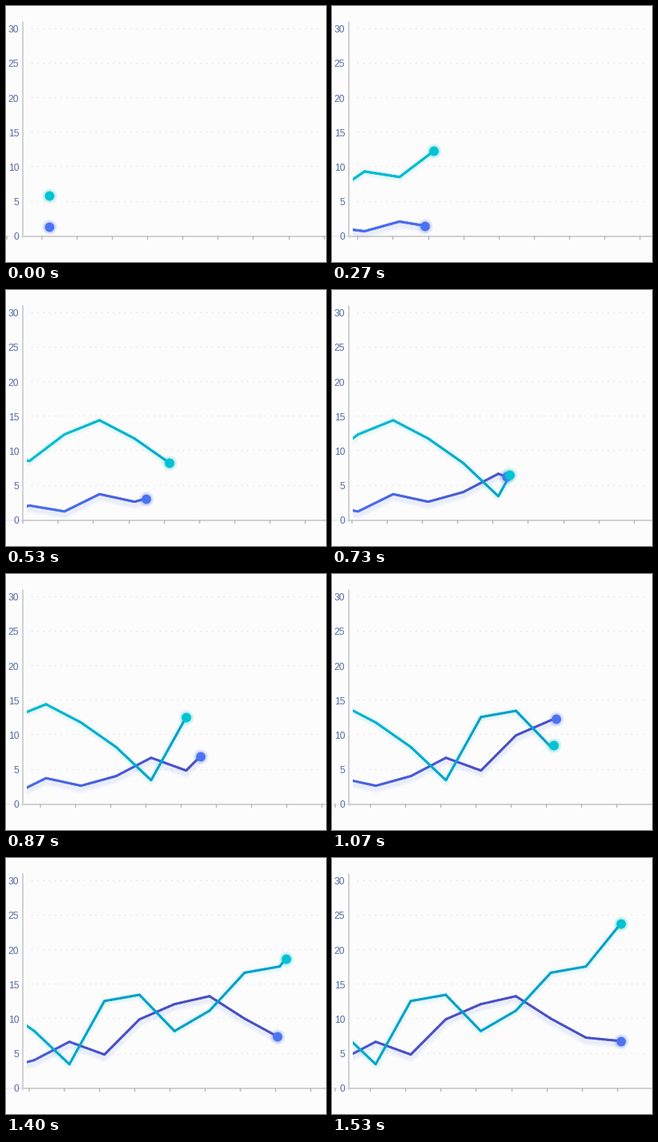
These frames come from a looping animation (400x320 px, 1940 ms). A matplotlib script:

```python
import numpy as np
import matplotlib.pyplot as plt
from matplotlib.animation import FuncAnimation
from matplotlib.collections import LineCollection
from matplotlib.colors import to_rgb
from matplotlib.patches import Rectangle

W, H, DPI = 400, 320, 100
PX = 72 / DPI                 # points per pixel
LOOP, TICK = 1940, 10         # ms
FPS, LAST = 15, 23            # motion steps per second, last step before the hold
ZERO, UNIT = 286.7, 8.633     # y of value 0, pixels per unit
STEP = 43.8                   # distance between data points
TICK_STEP = 44.1

fig = plt.figure(figsize=(W / DPI, H / DPI), dpi=DPI, facecolor="#fcfcfc")
ax = fig.add_axes([0, 0, 1, 1])
ax.set(xlim=(0, W), ylim=(H, 0))
ax.axis("off")


def rule(xs, ys, color, width, **kw):
    ax.plot(xs, ys, color=color, lw=width * PX, **kw)


def draw_axes():
    for value in range(0, 31, 5):
        y = ZERO - value * UNIT
        if value:
            rule([31, 392], [y, y], "#ebebec", 1.3, dashes=(1.6, 4), zorder=1)
        ax.text(16.2, y + 1.1, str(value), ha="right", va="center_baseline",
                fontsize=12 * PX, family="Liberation Sans", color="#566ba2")
    rule([21.3, 21.3], [20, 289], "#c3c3c6", 1.5, zorder=2)
    rule([21, W], [288, 288], "#d0d0d2", 2, zorder=2)
    rule([0, 21], [288, 288], "#ececee", 1.5, zorder=1)


class Series:
    """A line drawn behind a dot that travels along it.

    keys holds (step, point index) pairs; between them the dot keeps its speed.
    """

    def __init__(self, values, keys, colors, dot, drop, z):
        self.x = STEP * np.arange(len(values))
        self.y = ZERO - UNIT * np.array(values)
        seg = np.hypot(np.diff(self.x), np.diff(self.y))
        self.arc = np.concatenate([[0], np.cumsum(seg)])
        self.steps, points = zip(*keys)
        self.heads = self.arc[list(points)]
        self.colors = [np.array(to_rgb(c)) for c in colors]
        self.drop = drop
        self.glow = [ax.plot([], [], color=dot, alpha=0.035, lw=w * PX,
                             zorder=z, solid_joinstyle="round")[0]
                     for w in (5, 8, 11)]
        self.line = LineCollection([], linewidths=3 * PX, capstyle="round",
                                   zorder=z + 2)
        ax.add_collection(self.line, autolim=False)
        clip = Rectangle((25.5, 0), W, H, transform=ax.transData)
        for art in self.glow + [self.line]:
            art.set_clip_path(clip)
        self.dots = [ax.plot([], [], "o", color=dot, ms=d * PX, alpha=a, mew=0,
                             snap=False, zorder=z + 4)[0]
                     for d, a in ((20, 0.06), (17, 0.1), (14.5, 0.12), (11.8, 1))]

    def draw(self, n, shift):
        head = np.interp(n, self.steps, self.heads)
        s = np.union1d(np.linspace(0, head, 120), self.arc[self.arc < head])
        x = np.interp(s, self.arc, self.x)
        pts = np.column_stack([x + shift, np.interp(s, self.arc, self.y)])
        fade = np.clip(x[:-1] / STEP / 5 - 0.6, 0, 1)[:, None]
        a, b = self.colors
        self.line.set_segments(np.stack([pts[:-1], pts[1:]], axis=1))
        self.line.set_color(a + (b - a) * fade)
        for g in self.glow:
            g.set_data(pts[:, 0], pts[:, 1] + self.drop)
        for d in self.dots:
            d.set_data(pts[-1:, 0], pts[-1:, 1])


draw_axes()
ticks = LineCollection([], colors="#bdbdc0", linewidths=1.5 * PX, zorder=2)
ax.add_collection(ticks, autolim=False)

blue = Series(
    [1.25, 0.6, 2, 1.15, 3.65, 2.55, 3.95, 6.6, 4.75, 9.85, 12.05, 13.2, 9.95, 7.2, 6.7],
    [(0, 0), (19, 12), (LAST, 14)],
    ("#4a6cee", "#4850c6"), "#4b73f1", 4, 3)
teal = Series(
    [5.8, 9.25, 8.45, 12.3, 14.35, 11.7, 8.15, 3.35, 12.5, 13.4, 8.15, 11.1, 16.6, 17.5, 23.75],
    [(0, 0), (8, 6), (13, 8), (19, 12), (LAST, 14)],
    ("#00bcd2", "#00a0c9"), "#00c3d2", 1, 4)


def update(frame):
    n = min(LAST, int((frame + 0.5) * TICK * FPS / 1000))
    u = n / LAST
    shift = 53.5 - 305.5 * u * (1.08 - 0.08 * u)   # scroll, easing out slightly
    first = (shift + 7 * STEP - 6.5) % TICK_STEP - TICK_STEP
    ticks.set_segments([[(x, 287), (x, 291.5)]
                        for x in np.arange(first, W + 1, TICK_STEP)])
    blue.draw(n, shift)
    teal.draw(n, shift)
    return []


anim = FuncAnimation(fig, update, frames=LOOP // TICK, interval=TICK,
                     repeat=True, repeat_delay=0)
plt.show()
```
